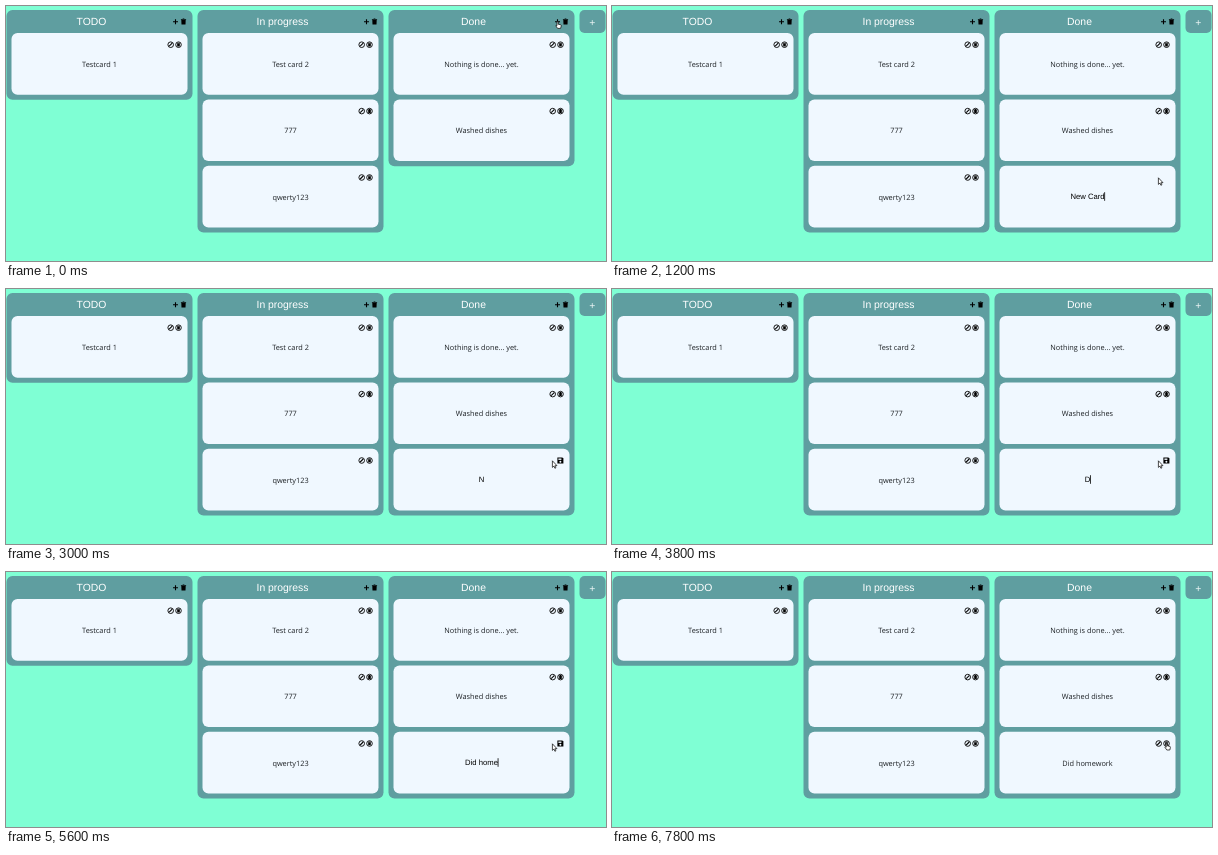
An HTML page that plays this animation: 600 by 255 pixels, repeating every 8000 ms.

```html
<!DOCTYPE html>
<html lang="en">
<head>
<meta charset="utf-8">
<title>Task board</title>
<style>
html, body { margin: 0; width: 100%; height: 100%; overflow: hidden; background: #7fffd4; }
svg { display: block; }
text { text-anchor: middle; white-space: pre; text-rendering: geometricPrecision; }
.title { font: 10.4px "Liberation Sans", Arial, sans-serif; fill: #fff; }
.label { font: 7.35px "Open Sans", "Noto Sans", sans-serif; fill: #1c2024; }
.field { font: 7.7px "Liberation Sans", Arial, sans-serif; fill: #000; }
.col { fill: #5f9ea0; }
.card { fill: #f0f8ff; }
</style>
</head>
<body>
<svg id="stage" width="600" height="255" viewBox="0 0 600 255">
  <defs>
    <path id="plus" d="M-2.5 0H2.5M0 -2.5V2.5" fill="none"/>
    <path id="bin" d="M-2.6 -2.7H-1L-.7 -3.2H.7L1 -2.7H2.6V-1.9H-2.6ZM-2.2 -1.6H2.2L2 3H-2Z"/>
    <g id="edit">
      <circle r="2.8" fill="none" stroke="#000" stroke-width=".9"/>
      <path d="M-1.5 1.5L1.5 -1.5" stroke="#000" stroke-width="1.1"/>
    </g>
    <g id="remove">
      <circle r="2.8" fill="none" stroke="#000" stroke-width=".9"/>
      <use href="#bin" transform="scale(.62)"/>
    </g>
    <g id="disk">
      <path d="M-3 -3H2L3 -2V3H-3Z"/>
      <path d="M-2 -2.1H1V-.7H-2Z" fill="#f0f8ff"/>
      <circle cy="1.2" r="1" fill="#f0f8ff"/>
    </g>
    <path id="arrow" d="M0 0V6.6L1.5 5.3 2.5 7.5 3.5 7 2.5 4.9H4.6Z"/>
    <path id="hand" d="M0 .4Q.6 -.4 1.2 .4V2.6L3.8 3.2Q4.4 3.5 4.2 4.4L3.6 6.8H.6L-1.2 4.2Q-1 3.4 0 4Z"/>
  </defs>
</svg>
<script>
const LOOP = 8000, TICK = 200, PITCH = 191, ROW = 66.4;
const stage = document.getElementById('stage');
const $ = id => document.getElementById(id);

const rect = (cls, x, y, w, h, r, id = '') =>
  `<rect id="${id}" class="${cls}" x="${x}" y="${y}" width="${w}" height="${h}" rx="${r}"/>`;
const text = (cls, x, y, s, id = '') => `<text id="${id}" class="${cls}" x="${x}" y="${y}">${s}</text>`;
const use = (name, x, y, extra = '') => `<use href="#${name}" x="${x}" y="${y}" ${extra}/>`;
const colHeight = n => 23.4 + n * ROW;

function card(x, row, label) {
  const y = 27 + row * ROW;
  return rect('card', x + 5, y, 176, 61.7, 6) +
    `<g class="view">${text('label', x + 93, y + 33.9, label)}` +
    use('edit', x + 164.2, y + 11.7) + use('remove', x + 172, y + 11.7) + '</g>';
}

function column(i, title, labels) {
  const x = .5 + i * PITCH;
  return rect('col', x, 4, 186, colHeight(labels.length), 6, 'col' + i) +
    text('title', x + 85, 19.3, title) +
    use('plus', x + 169, 15.8, 'stroke="#000" stroke-width="1.1"') +
    use('bin', x + 177, 15.6) +
    labels.map((s, row) => card(x, row, s)).join('');
}

const board = column(0, 'TODO', ['Testcard 1']) +
  column(1, 'In progress', ['Test card 2', '777', 'qwerty123']) +
  column(2, 'Done', ['Nothing is done... yet.', 'Washed dishes']) +
  rect('col', 573.5, 4, 26, 23, 5) +
  use('plus', 586.3, 16.6, 'stroke="#e8f3f3" stroke-width=".8"') +
  `<g id="fresh">${card(.5 + 2 * PITCH, 2, '')}</g>` +
  text('field', 475.5, 193.3, '', 'field') +
  '<rect id="caret" y="186.2" width=".8" height="8.6"/>' +
  use('disk', 554.4, 171.6, 'id="save"') +
  '<use id="pointer" fill="#fff" stroke="#000" stroke-width=".7"/>';
stage.insertAdjacentHTML('beforeend', board);

const view = stage.querySelector('#fresh .view');
const label = view.querySelector('text');

// Each track holds [start time, values...]
const typing = [[0, ''], [1200, 'New Card'], [2400, 'New Car'], [2600, 'New C'], [2800, 'Ne'],
  [3000, 'N'], [3200, ''], [3800, 'D'], [4400, 'Di'], [4600, 'Did'], [4800, 'Did '],
  [5000, 'Did h'], [5200, 'Did ho'], [5400, 'Did hom'], [5600, 'Did home'],
  [6000, 'Did homew'], [6200, 'Did homewor'], [6400, 'Did homework']];
const blink = [[0, 0], [1200, 1], [1800, 0], [2200, 1], [3000, 0], [3400, 1], [7000, 0]];
const moves = [[0, 551, 15.6, 'hand'], [200, 549, 19.4, 'arrow'], [400, 549, 48, 'arrow'],
  [600, 549, 112, 'arrow'], [800, 547, 163, 'arrow'], [1000, 546.4, 171.6, 'hand'],
  [1200, 546.4, 171.8, 'arrow'], [6800, 549, 172, 'arrow'], [7000, 553, 171.5, 'hand'],
  [7400, 553.5, 172, 'hand'], [7600, 554, 171.6, 'hand'], [7800, 554.2, 171.2, 'hand']];
const at = (track, t) => track.findLast(k => k[0] <= t);
const show = (el, on) => el.setAttribute('visibility', on ? 'visible' : 'hidden');

function draw(now) {
  const t = Math.floor(now % LOOP / TICK) * TICK;
  const added = t >= 200, editing = t >= 1200 && t < 7200;

  $('col2').setAttribute('height', colHeight(added ? 3 : 2));
  show($('fresh'), added);
  show(view, added && !editing);
  label.textContent = t < 1200 ? 'New Card' : 'Did homework';

  const field = $('field');
  field.textContent = at(typing, t)[1];
  show(field, editing);
  show($('save'), editing && t >= 1400);
  show($('caret'), editing && at(blink, t)[1]);
  $('caret').setAttribute('x', 475.2 + field.getComputedTextLength() / 2);

  const [, x, y, shape] = at(moves, t);
  const pointer = $('pointer');
  pointer.setAttribute('href', '#' + shape);
  pointer.setAttribute('x', x);
  pointer.setAttribute('y', y);
}

function loop() {
  draw(performance.now());
  requestAnimationFrame(loop);
}
loop();
</script>
</body>
</html>
```
